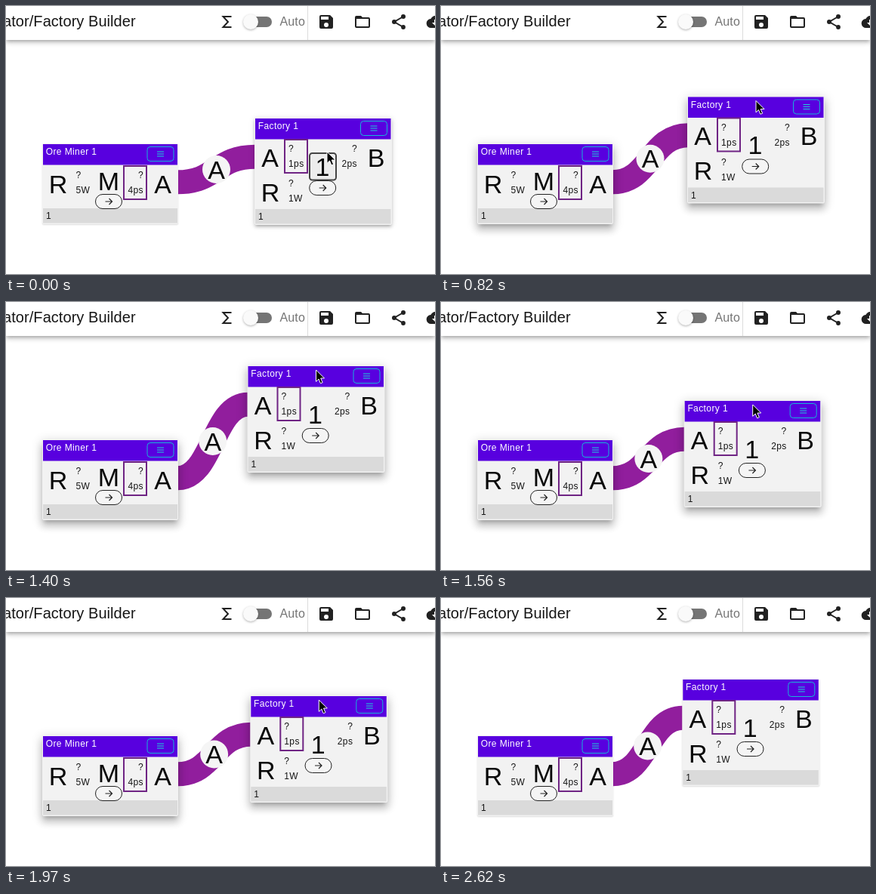
An HTML page for the animation above (2.87 s loop, 568x355 px).

```html
<!DOCTYPE html>
<html lang="en">
<head>
<meta charset="utf-8">
<title>Factory Builder</title>
<style>
  html, body { margin: 0; width: 100%; height: 100%; overflow: hidden; background: #fff; }
  body { position: relative; font-family: "Liberation Sans", Arial, Helvetica, sans-serif; }
  svg { position: absolute; left: 0; top: 0; overflow: visible; }
  .bar {
    position: absolute; left: 0; top: 0; width: 100%; height: 45px; background: #fff;
    box-shadow: 0 2px 4px -1px rgba(0,0,0,.2), 0 4px 5px rgba(0,0,0,.14), 0 1px 10px rgba(0,0,0,.12);
  }
  .card { position: absolute; left: 0; top: 0; margin: -1px; border: 1px solid #f2f2f2; border-radius: 2px; background: #f2f2f2; }
  .rest { box-shadow: 0 1px 2px rgba(0,0,0,.14); }
  .fade { box-shadow: 0 2px 3px rgba(0,0,0,.2), 0 1px 6px rgba(0,0,0,.12); }
  .hover { box-shadow: 0 3px 3px -2px rgba(0,0,0,.2), 0 3px 4px rgba(0,0,0,.14), 0 1px 8px rgba(0,0,0,.12); }
  .held { box-shadow: 0 5px 5px -3px rgba(0,0,0,.2), 0 8px 10px 1px rgba(0,0,0,.14), 0 3px 14px 2px rgba(0,0,0,.14); }
  .small { font-size: 12px; letter-spacing: .4px; fill: #151515; }
  .big { font-size: 34px; text-anchor: middle; fill: #080808; }
  .icon { fill: #212121; }
  .line { fill: none; stroke: #212121; stroke-width: 2; }
</style>
</head>
<body>
<svg width="568" height="355">
  <path id="link" fill="none" stroke="#911e9d" stroke-width="32"/>
  <g id="tag">
    <circle r="18.5" fill="#f5f5f5"/>
    <text class="big" y="12.2">A</text>
  </g>
</svg>
<div id="ore" class="card"></div>
<div id="factory" class="card"></div>
<div class="bar">
  <svg width="568" height="45">
    <text x="171.6" y="27.3" text-anchor="end" font-size="20" letter-spacing=".05" fill="#161616">ator/Factory Builder</text>
    <path class="line" d="M298.5 14H287.5L294 21L287.5 28H298.5"/>
    <rect x="317" y="14" width="35" height="14" rx="7" fill="#757575"/>
    <circle cx="324" cy="21" r="10" fill="#fafafa" style="filter:drop-shadow(0 1px 1.5px rgba(0,0,0,.3))"/>
    <text x="362.5" y="26.3" font-size="16" letter-spacing=".15" fill="#757575">Auto</text>
    <path d="M399.5 0V45" stroke="#dcdcdc"/>
    <path class="icon" fill-rule="evenodd" transform="translate(412 9)"
      d="M17 3H5a2 2 0 0 0-2 2v14a2 2 0 0 0 2 2h14a2 2 0 0 0 2-2V7zM12 19a3 3 0 1 1 0-6 3 3 0 0 1 0 6zM15 9H5V5h10z"/>
    <g transform="translate(460 9)">
      <path class="line" d="M3 7V18a1 1 0 0 0 1 1H20a1 1 0 0 0 1-1V8a1 1 0 0 0-1-1H3"/>
      <path class="icon" d="M2 8V6a2 2 0 0 1 2-2h6l2 2v2z"/>
    </g>
    <g class="icon" transform="translate(508 9)">
      <path class="line" d="M18 5L6 12l12 7"/>
      <circle cx="18" cy="5" r="3"/><circle cx="6" cy="12" r="3"/><circle cx="18" cy="19" r="2.9"/>
    </g>
    <path class="icon" fill-rule="evenodd" transform="translate(557 9)"
      d="M19.35 10A7.5 7.5 0 0 0 5.35 8 6 6 0 0 0 6 20h13a5 5 0 0 0 .35-10zM17 13l-5 5-5-5h3V9h4v4z"/>
  </svg>
</div>
<svg width="568" height="355">
  <path id="cursor" d="M0 0V15.4L3.5 12 5.9 17.8 8.6 16.7 6.2 11H11z" fill="#000" stroke="#fff"/>
</svg>

<script>
const LOOP = 2870, TICK = 80;
const GRAB = 570, DROP = 2380, LEAVE = 2540;
const HOME = { x: 330, y: 149 }, GRIP = { x: 90, y: 5 };
const ORE = { x: 49, y: 183, w: 178, h: 105 };
const $ = id => document.getElementById(id);

const small = (x, y, s, anchor = 'start') =>
  `<text class="small" x="${x}" y="${y}" text-anchor="${anchor}">${s}</text>`;
const big = (x, y, s) => `<text class="big" x="${x}" y="${y}">${s}</text>`;
const stat = (x, y, s, anchor) => small(x, y, '?', anchor) + small(x, y + 20, s, anchor);
const port = (x, y) =>
  `<rect x="${x}" y="${y}" width="30" height="44" fill="none" stroke="#6f2484" stroke-width="2"/>`;
const pill = (x, y) => `<g transform="translate(${x} ${y})" fill="none" stroke="#222">
  <rect x="-17.5" y="-9.5" width="35" height="19" rx="9.5" fill="#f5f5f5"/>
  <path d="M-4.5 0H4M.5-4L4.5 0 .5 4" stroke-width="1.2"/></g>`;

function build(id, w, h, title, parts) {
  const el = $(id), foot = h - 20;
  el.style.width = w + 'px';
  el.style.height = h + 'px';
  el.innerHTML = `<svg width="${w}" height="${h}">
    <rect width="${w}" height="27.5" fill="#5800df"/>
    <rect y="${foot}" width="${w}" height="19.5" fill="#dadada"/>
    <text class="small" x="3.7" y="14" style="fill:#fff">${title}</text>
    <g transform="translate(${w - 40} 3.5)" fill="none" stroke="#16b6d8">
      <rect width="35" height="19" rx="4"/>
      <path d="M13 6.5h9M13 9.5h9M13 12.5h9" stroke="#1ccfd8"/>
    </g>
    ${small(4, foot + 14, '1')}${parts.join('')}</svg>`;
}

build('ore', ORE.w, ORE.h, 'Ore Miner 1', [
  big(20, 64.7, 'R'), stat(43.5, 45, '5W'),
  big(87, 61, 'M'), pill(87, 76),
  port(107, 29), stat(133, 45, '4ps', 'end'), big(158.5, 64.7, 'A')
]);
build('factory', 179.5, 140, 'Factory 1', [
  big(19.5, 63.6, 'A'), port(39, 28), stat(44, 44, '1ps'),
  '<rect id="hot" x="72" y="46" width="35" height="35.5" rx="3.5" fill="#ececec" stroke="#444" stroke-width="2"/>',
  big(89, 75.8, '1'), pill(89.2, 92),
  stat(135, 44, '2ps', 'end'), big(160, 63.6, 'B'),
  big(20, 109.6, 'R'), stat(44, 90, '1W')
]);

// The screen refreshes every TICK inside these spans and holds still between them.
const BURSTS = [[0, 240], [GRAB, GRAB], [740, 1140], [1400, 1720], [1890, 2210], [DROP, DROP], [LEAVE, 2620]];
function refresh(ms) {
  const [a, b] = BURSTS.findLast(s => s[0] <= ms);
  return Math.min(b, a + TICK * Math.floor((ms - a) / TICK));
}

// Key points of the dragged card: ms, x, y.
const PATH = [
  [660, HOME.x, HOME.y], [980, 324, 92], [1400, 320.5, 85],
  [1560, 322.7, 131], [1720, 323.5, 141], [1890, 324.3, 141],
  [1970, 324.3, 130], [2210, 320.3, 108]
];
const mix = (a, b, k) => a + (b - a) * k;
const clamp = k => Math.min(1, Math.max(0, k));
function cardAt(t) {
  const i = Math.max(1, PATH.findIndex(p => p[0] >= t));
  const [a, b] = t > PATH.at(-1)[0] ? PATH.slice(-2) : [PATH[i - 1], PATH[i]];
  const k = clamp((t - a[0]) / (b[0] - a[0]));
  return [mix(a[1], b[1], k), mix(a[2], b[2], k)];
}

function draw(ms) {
  const t = refresh(ms);
  const [x, y] = cardAt(t);
  const held = t >= GRAB && t < DROP;

  $('factory').style.transform = `translate(${x}px,${y}px)`;
  $('factory').className = 'card ' +
    (held ? 'held' : t < LEAVE ? 'hover' : t < LEAVE + TICK ? 'fade' : 'rest');
  $('ore').className = 'card ' + (held ? 'held' : 'rest');

  const x0 = ORE.x + ORE.w, y0 = ORE.y + 50.3, y1 = y + 50.7;
  const mx = (x0 + x) / 2, my = (y0 + y1) / 2;
  $('link').setAttribute('d', `M${x0} ${y0}C${mx} ${y0} ${mx} ${y1} ${x} ${y1}`);
  $('tag').setAttribute('transform', `translate(${mx} ${my})`);

  // The pointer starts on the number, then moves up to the grip.
  const away = 1 - clamp(t / 240);
  $('hot').style.display = t < TICK ? '' : 'none';
  $('cursor').style.display = t < LEAVE ? '' : 'none';
  $('cursor').setAttribute('transform', `translate(${x + GRIP.x + 5 * away} ${y + GRIP.y + 39 * away})`);
}

$('ore').style.transform = `translate(${ORE.x}px,${ORE.y}px)`;
const start = performance.now();
function tick() {
  draw((performance.now() - start) % LOOP);
  requestAnimationFrame(tick);
}
tick();
</script>
</body>
</html>
```
